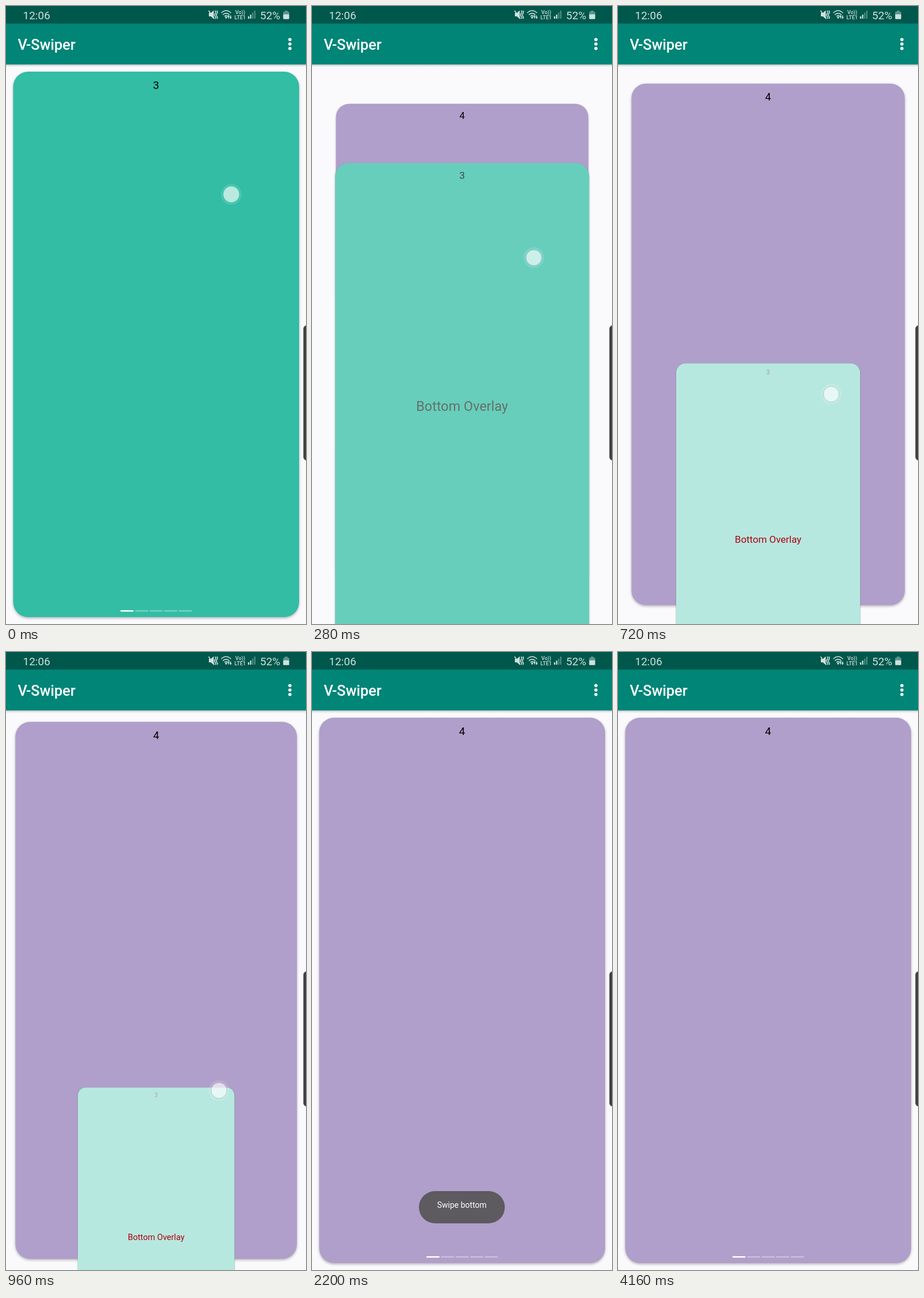
An HTML page for the animation above (5000 ms loop, 522x1073 px).

```html
<!DOCTYPE html>
<html lang="en">
<head>
<meta charset="utf-8">
<title>Card swipe</title>
<style>
  html, body { margin: 0; width: 100%; height: 100%; overflow: hidden; background: #faf9fc; }
  svg { display: block; width: 100%; height: 100%; font-family: Roboto, sans-serif; }
  .middle { text-anchor: middle; }
  .face { filter: drop-shadow(0 2px 2px rgba(0, 0, 0, .28)); }
  .number { font-size: 19px; }
  .status { font-size: 19px; fill: #cfe1de; }
  .tiny { font-size: 9px; font-weight: 500; fill: #cfe1de; }
  .line { fill: none; stroke: #cfe1de; stroke-width: 1.6; }
</style>
</head>
<body>
<svg viewBox="0 0 522 1073">
  <defs>
    <linearGradient id="barShadow" x2="0" y2="1">
      <stop stop-color="#000" stop-opacity=".2"/>
      <stop offset="1" stop-color="#000" stop-opacity="0"/>
    </linearGradient>
    <g id="pages">
      <rect x="199" width="23" height="2.6" rx="1.3" fill="#fff"/>
      <g fill="#fff" fill-opacity=".33">
        <rect x="224.5" width="23" height="2.6" rx="1.3"/>
        <rect x="249.8" width="23" height="2.6" rx="1.3"/>
        <rect x="275.1" width="23" height="2.6" rx="1.3"/>
        <rect x="300.4" width="23" height="2.6" rx="1.3"/>
      </g>
    </g>
  </defs>

  <rect width="522" height="1073" fill="#faf9fc"/>

  <g id="backCard">
    <rect class="face" x="12.5" y="114" width="497.5" height="947" rx="26" fill="#b09fca"/>
    <text class="number middle" x="261.2" y="144.3">4</text>
    <use href="#pages" y="1049"/>
  </g>

  <g id="topCard">
    <rect class="face" x="12.5" y="114" width="497.5" height="947" rx="26" fill="#32bda4"/>
    <text class="number middle" x="261.2" y="144.3">3</text>
    <use href="#pages" y="1049"/>
    <g id="overlay">
      <rect x="12.5" y="114" width="497.5" height="947" rx="26" fill="#fff" fill-opacity=".65"/>
      <text class="middle" x="261.2" y="598" font-size="26.4" fill="#b00010">Bottom Overlay</text>
    </g>
  </g>

  <rect y="101" width="522" height="5" fill="url(#barShadow)"/>
  <rect y="30" width="522" height="71.5" fill="#008577"/>
  <rect width="522" height="30.5" fill="#00574b"/>
  <text x="20.5" y="76" font-size="25.4" font-weight="500" fill="#fff">V-Swiper</text>
  <g fill="#fff">
    <circle cx="494" cy="58.3" r="2.8"/>
    <circle cx="494" cy="66" r="2.8"/>
    <circle cx="494" cy="73.7" r="2.8"/>
  </g>

  <text class="status" x="29.5" y="22.5">12:06</text>
  <text class="status" x="442" y="22.5">52%</text>
  <g fill="#cfe1de">
    <path d="M353 12h3.5l5-4.5v15l-5-4.5H353z"/>
    <path class="line" d="M352.5 8l10 14M364 8q2 2.5 0 5t0 5t0 4M367 8q2 2.5 0 5t0 5t0 4"/>
    <path class="line" d="M374.5 12q8.5-8 17 0M377.3 15.2q5.7-5 11.4 0M380 18q3-2.6 6 0"/>
    <circle cx="383" cy="20" r="1.7"/>
    <path d="M386.5 21.5v-3h-1.5l2.3-3 2.3 3H388v3zM390 16.5h1.5v3h1.5l-2.2 3-2.2-3h1.4z"/>
    <text class="tiny" x="399" y="13.8">Vo))</text>
    <text class="tiny" x="397.5" y="22.5">LTE1</text>
    <path d="M421 18h2.2v4H421zM424.6 15h2.2v7h-2.2z"/>
    <path d="M428.2 11.5h2.2V22h-2.2zM431.8 8h2.2v14h-2.2z" opacity=".4"/>
    <path d="M485 8h5v2h2.7v5h-10.4v-5H485z" opacity=".45"/>
    <path d="M482.3 14.5h10.4v7q0 1.2-1.2 1.2h-8q-1.2 0-1.2-1.2z"/>
  </g>

  <rect x="517.5" y="554.5" width="16" height="234.5" rx="6" fill="#3f3e41" stroke="#8c8a8e" stroke-width=".8"/>

  <g id="toast">
    <rect x="186" y="936" width="149.5" height="56" rx="28" fill="#5d5a60"/>
    <text class="middle" x="260.8" y="964.7" font-size="14" fill="#fff">Swipe bottom</text>
  </g>

  <g id="touch" fill="#fff">
    <circle r="18" fill-opacity=".12"/>
    <circle id="touchDot" r="13.7" fill-opacity=".62" stroke="#8aa4b4"/>
  </g>
</svg>
<script>
const LOOP = 5000, STEP = 40, HEIGHT = 947;
const CENTER = { x: 261.2, y: 587.5 };
const $ = id => document.getElementById(id);
const clamp = v => Math.min(1, Math.max(0, v));
const span = (t, from, to) => clamp((t - from) / (to - from));

// Smooth curve through [time, value] points
function curve(points) {
  const slope = (a, b) => (points[b][1] - points[a][1]) / (points[b][0] - points[a][0]);
  const last = points.length - 1;
  const tangents = points.map((_, i) => slope(Math.max(0, i - 1), Math.min(last, i + 1)));
  return t => {
    if (t >= points[last][0]) return points[last][1];
    const i = points.findIndex((_, k) => t < points[k + 1][0]);
    const [t0, v0] = points[i], [t1, v1] = points[i + 1];
    const d = t1 - t0, u = (t - t0) / d, w = 1 - u;
    return v0 * (1 + 2 * u) * w * w + v1 * u * u * (3 - 2 * u)
      + d * u * w * (tangents[i] * w - tangents[i + 1] * u);
  };
}

const dragY = curve([[0, 0], [280, 105.8], [720, 337.6], [1360, 562], [1440, 595], [1680, 860]]);
const touchX = curve([[0, 392], [280, 386], [720, 371], [1360, 374], [1480, 375]]);
const touchY = curve([[0, 327], [280, 437], [720, 674], [1360, 884], [1480, 915]]);

function place(card, dy, scale) {
  card.setAttribute('transform',
    `translate(${CENTER.x} ${CENTER.y + dy}) scale(${scale}) translate(${-CENTER.x} ${-CENTER.y})`);
}

function draw(t) {
  const dy = dragY(t), progress = dy / HEIGHT;
  place($('topCard'), dy, Math.max(.5, 1 - progress));
  place($('backCard'), 0, Math.min(1, .849 + .3 * progress));
  $('overlay').setAttribute('opacity', clamp(progress / .28));
  $('topCard').setAttribute('visibility', t < 1680 ? 'visible' : 'hidden');

  $('touch').setAttribute('transform', `translate(${touchX(t)} ${touchY(t)})`);
  $('touch').setAttribute('opacity', 1 - span(t, 1400, 1520));
  $('touchDot').setAttribute('stroke-opacity', .55 * span(t, 0, 160));

  const fadeIn = 1 - (1 - span(t, 1700, 2200)) ** 2;
  const fadeOut = span(t, 3600, 4140) ** 2;
  $('toast').setAttribute('opacity', fadeIn * (1 - fadeOut));
}

const start = performance.now();
function tick() {
  const t = (performance.now() - start) % LOOP;
  draw(Math.floor(t / STEP) * STEP);
  requestAnimationFrame(tick);
}
tick();
</script>
</body>
</html>
```
